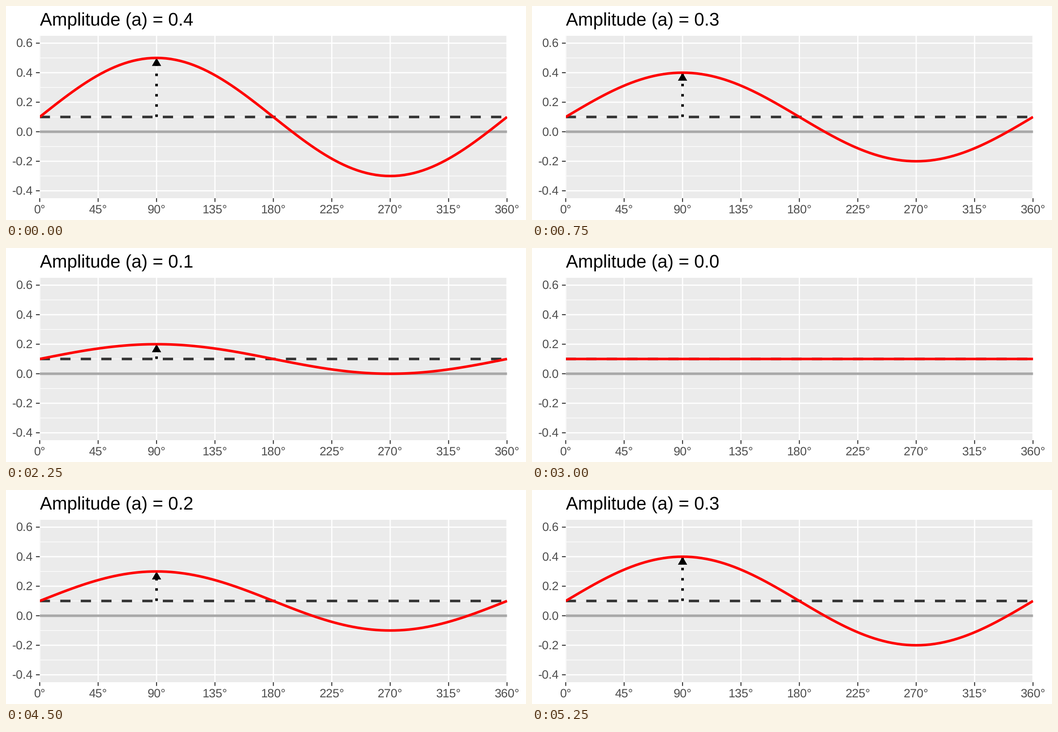
A matplotlib script that plays this animation: 1164x481 px, repeating every 6 s.

```python
import numpy as np
import matplotlib.pyplot as plt
from matplotlib.animation import FuncAnimation
from matplotlib.patches import Polygon, Rectangle

# A power of two keeps the pixel size exact.
W, H, DPI = 1164, 481, 64
LEFT, RIGHT, TOP, BOTTOM = 75.5, 1121.5, 67, 432
STEPS, STEP_MS = 8, 750
MEAN = 0.1
LINE, GRID, TICK = 5.74, 2.8, 2.2
HEAD = 18

plt.rcParams.update({
    "font.family": "Liberation Sans",
    "text.hinting": "none",
    "path.snap": False,
    "path.simplify": False,
})


def pt(px):
    return px * 72 / DPI


def to_x(deg):
    return LEFT + (RIGHT - LEFT) * deg / 360


def to_y(value):
    return 282.6 - 331.8 * value


fig = plt.figure(figsize=(W / DPI, H / DPI), dpi=DPI, facecolor="white")
ax = fig.add_axes([0, 0, 1, 1])
ax.set_xlim(0, W)
ax.set_ylim(H, 0)
ax.axis("off")

panel = Rectangle((LEFT, TOP), RIGHT - LEFT, BOTTOM - TOP,
                  facecolor="#ebebeb", linewidth=0, zorder=0)
ax.add_patch(panel)


def stroke(xs, ys, color, width, z, style="-", clip=True):
    line, = ax.plot(xs, ys, color=color, lw=pt(width), ls=style, zorder=z,
                    solid_capstyle="butt", dash_capstyle="butt")
    if clip:
        line.set_clip_path(panel)
    return line


def label(x, y, text, size, color, align):
    return ax.text(x, y, text, fontsize=pt(size), color=color,
                   ha=align, va="baseline")


def draw_axes():
    for value in np.arange(-3, 6, 2) / 10:
        stroke([LEFT, RIGHT], [to_y(value)] * 2, "white", GRID / 2, 1)
    for value in np.arange(-4, 7, 2) / 10:
        y = to_y(value)
        stroke([LEFT, RIGHT], [y, y], "white", GRID, 1)
        stroke([LEFT - 8.4, LEFT], [y, y], "#333333", TICK, 1, clip=False)
        label(60.3, y + 9.7, f"{value:.1f}", 27, "#4d4d4d", "right")
    for deg in range(0, 361, 45):
        x = to_x(deg)
        stroke([x, x], [TOP, BOTTOM], "white", GRID, 1)
        stroke([x, x], [BOTTOM, BOTTOM + 8.4], "#333333", TICK, 1, clip=False)
        label(x, 467, f"{deg}°", 27, "#4d4d4d", "center")


draw_axes()
base, peak_x = to_y(MEAN), to_x(90)
stroke([LEFT, RIGHT], [to_y(0)] * 2, "#a9a9a9", LINE, 2)
stroke([LEFT, RIGHT], [base, base], "#333333", LINE, 3, (0, (4, 4)))
shaft = stroke([peak_x] * 2, [base, base], "black", LINE, 4, (0, (1, 3)))
head = Polygon(np.zeros((3, 2)), facecolor="black", linewidth=0, zorder=4)
ax.add_patch(head)

degrees = np.linspace(0, 360, 101)
wave = stroke(to_x(degrees), np.full(101, base), "red", LINE, 5)
title = label(LEFT, 44, "", 40.5, "black", "left")


def update(step):
    amp = abs(STEPS // 2 - step) / 10
    title.set_text(f"Amplitude (a) = {amp:.1f}")
    wave.set_ydata(to_y(MEAN + amp * np.sin(np.radians(degrees))))

    tip = to_y(MEAN + amp)
    half = HEAD / np.sqrt(3)
    shaft.set_ydata([base, tip])
    head.set_xy([(peak_x, tip), (peak_x - half, tip + HEAD),
                 (peak_x + half, tip + HEAD)])
    shaft.set_visible(amp > 0)
    head.set_visible(amp > 0)
    return title, wave, shaft, head


anim = FuncAnimation(fig, update, frames=STEPS, interval=STEP_MS,
                     repeat=True, repeat_delay=0)
plt.show()
```
